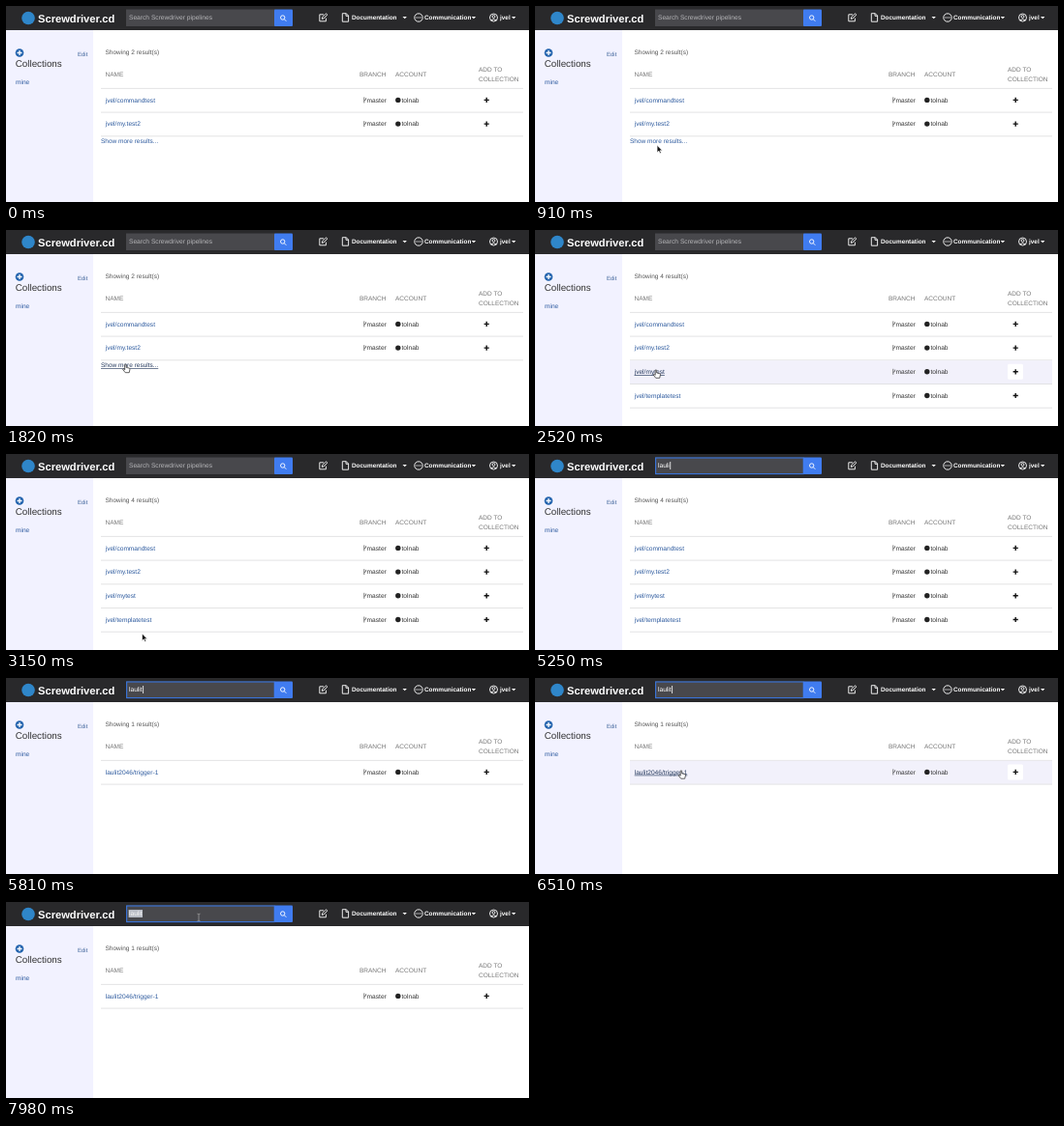
An HTML page for the animation above (8000 ms loop, 540 px wide and 203 px high).

```html
<!DOCTYPE html>
<html lang="en">
<head>
<meta charset="utf-8">
<title>Pipeline search</title>
<style>
  html, body { margin: 0; width: 100%; height: 100%; overflow: hidden; background: #fff; }
  svg { display: block; width: 100%; height: 100%; }
  text { font: 6.6px "Liberation Sans", Arial, sans-serif; fill: #333; white-space: pre; text-rendering: geometricPrecision; }
  .bar text { fill: #fff; font-weight: bold; font-size: 6.4px; }
  .bar .brand { font-size: 11.15px; }
  .bar .field { font-weight: normal; font-size: 6.65px; }
  .head { fill: #777; font-size: 6.5px; }
  .link { fill: #2d5a9e; }
  .icon { fill: none; stroke: #fff; stroke-width: .9; }
  .rule { stroke: #dcdcde; stroke-width: .8; }
  .hover { fill: #f2f1fb; }
</style>
</head>
<body>
<svg viewBox="0 0 540 203">
  <rect width="540" height="203" fill="#fff"/>
  <rect y="25" width="90" height="178" fill="#f2f2ff"/>

  <g class="bar">
    <rect width="540" height="25" fill="#29292b"/>
    <circle cx="23" cy="12.5" r="6.8" fill="#2f86c9"/>
    <text class="brand" x="33" y="16.6">Screwdriver.cd</text>
    <rect x="124" y="3.5" width="154" height="17.5" fill="#48484c"/>
    <rect id="focus" x="124.6" y="4" width="152.6" height="16.6" fill="none" stroke="#3a76dd" stroke-width="1.1"/>
    <rect id="selection" x="126.6" y="8" width="14.4" height="8" fill="#b9bdc6"/>
    <text id="query" class="field" x="127" y="14.2"></text>
    <path id="caret" d="M0 8v8" stroke="#fff" stroke-width=".8"/>
    <rect x="277" y="3.5" width="19" height="17.5" rx="1" fill="#407cf0"/>
    <circle cx="285.7" cy="12" r="2.2" class="icon" stroke-width="1.2"/>
    <path class="icon" d="M287.3 13.7l2 2"/>

    <path class="icon" d="M328 8.8h-4.2v7h6.6v-3.2M326.3 13.4l.4-1.8 3.8-3.8 1.3 1.3-3.8 3.8z"/>
    <path class="icon" d="M347.3 7.7h4l2.3 2.3v6.2h-6.3zM351 7.8v2.5h2.5"/>
    <text x="357" y="14.2">Documentation</text>
    <circle class="icon" cx="426" cy="12" r="4.2"/>
    <path d="M423.4 12h5.4" stroke="#fff" stroke-width="1.2" stroke-dasharray="1.2 .8"/>
    <text x="432" y="14.2">Communication</text>
    <circle class="icon" cx="503.5" cy="12" r="4"/>
    <circle class="icon" cx="503.5" cy="10.9" r="1.4"/>
    <path class="icon" d="M500.8 14.8q2.7-2.4 5.4 0"/>
    <text x="510" y="14.2">jvel</text>
    <path fill="#fff" d="M409.5 10.9h4.4l-2.2 2.3zM480.7 10.9h4.4l-2.2 2.3zM522 10.9h4.4l-2.2 2.3z"/>
  </g>

  <circle cx="14" cy="48.5" r="4.3" fill="#2464ae"/>
  <path d="M11.5 48.5h5M14 46v5" stroke="#fff" stroke-width="1.3"/>
  <text x="74" y="52.4" style="font-size:6px;fill:#3f6499">Edit</text>
  <text x="9.8" y="63.2" style="font-size:9.8px">Collections</text>
  <text class="link" x="10" y="81.3">mine</text>

  <text id="count" x="102.5" y="49.6" style="fill:#555;font-size:6.5px"></text>
  <g>
    <text class="head" x="102.5" y="72.7">NAME</text>
    <text class="head" x="365" y="72.7">BRANCH</text>
    <text class="head" x="402" y="72.7">ACCOUNT</text>
    <text class="head" x="488" y="68.2">ADD TO</text>
    <text class="head" x="488" y="78">COLLECTION</text>
  </g>
  <path class="rule" d="M98 85.4h436"/>
  <g id="rows"></g>
  <text id="more" class="link" x="98" y="142" style="font-size:6.5px">Show more results...</text>

  <g id="cursor">
    <path id="arrow" d="M0 0v7.4l1.8-1.6 1.2 2.6 1.2-.6-1.2-2.4h2.3z" fill="#111" stroke="#fff" stroke-width=".6"/>
    <path id="hand" d="M-.8.2q.8-.8 1.5 0v2.7l3 .7q.9.3.7 1.4l-.7 3.2h-4l-2.6-3.3q.4-1 1.3-.3l.8.7z" fill="#fff" stroke="#222" stroke-width=".7"/>
    <path id="beam" d="M-1.5-3.8q1.5 0 1.5 1v5.6q0 1-1.5 1M1.5-3.8q-1.5 0-1.5 1M0 2.8q0 1 1.5 1" fill="none" stroke="#aaa" stroke-width=".7"/>
  </g>
</svg>

<script>
const LOOP = 8000, STEP = 70, ROW_TOP = 85.4, ROW_HEIGHT = 24.7;
const QUERY = "laulit";
const KEY_TIMES = [4690, 4830, 4970, 5110, 5220, 5400];
const TIMES = { expand: 2200, focus: 4060, results: 5700, select: 7600 };
const NAMES = ["jvel/commandtest", "jvel/my.test2", "jvel/mytest", "jvel/templatetest"];
const FOUND = ["laulit2046/trigger-1"];

// time, x, y of the pointer
const PATH = [
  [350, 165, 186], [840, 127, 146], [1050, 123.5, 139.5], [2450, 123.5, 139.5],
  [2800, 138, 193], [3100, 140.5, 186], [3450, 140.5, 186],
  [3950, 209, 12], [5900, 209, 12], [6350, 151, 96], [6540, 151, 96],
  [6680, 160, 82], [7250, 199, 16], [8000, 199, 16]
];

const $ = id => document.getElementById(id);
const show = (el, on) => el.setAttribute("visibility", on ? "visible" : "hidden");
const underline = (el, on) => {
  el.style.textDecoration = on ? "underline" : "none";
  el.style.fill = on ? "#263a5e" : "";
};

const rows = NAMES.map((_, i) => {
  const row = document.createElementNS("http://www.w3.org/2000/svg", "g");
  row.setAttribute("transform", `translate(0 ${ROW_TOP + i * ROW_HEIGHT})`);
  row.innerHTML = `
    <g class="mark"><rect class="hover" x="98" y=".4" width="436" height="24"/>
      <rect x="488" y="4" width="16" height="16" rx="1.5" fill="#fff"/></g>
    <text class="link name" x="102.7" y="14.2"></text>
    <path d="M369.8 9v6M369.8 12.6q2.2-.3 2-2.8" fill="none" stroke="#444" stroke-width=".7"/>
    <text x="372.6" y="14.2">master</text>
    <circle cx="404.8" cy="12" r="2.7" fill="#222"/>
    <text x="408.5" y="14.2">tolnab</text>
    <path d="M493.6 12h5.2M496.2 9.4v5.2" stroke="#111" stroke-width="1.4"/>
    <path class="rule" d="M98 ${ROW_HEIGHT}h436"/>`;
  $("rows").append(row);
  return { row, mark: row.querySelector(".mark"), name: row.querySelector(".name") };
});

function pointerAt(t) {
  const next = PATH.findIndex(p => p[0] > t);
  if (next < 1) return null;
  const [t0, x0, y0] = PATH[next - 1], [t1, x1, y1] = PATH[next];
  const u = (t - t0) / (t1 - t0), k = u * u * (3 - 2 * u);
  return { x: x0 + (x1 - x0) * k, y: y0 + (y1 - y0) * k };
}

function drawField(t) {
  const typed = QUERY.slice(0, KEY_TIMES.filter(k => k <= t).length);
  const selected = t >= TIMES.select, focused = t >= TIMES.focus;
  const query = $("query");
  query.textContent = typed || "Search Screwdriver pipelines";
  query.style.fill = selected ? "#f5f5f5" : typed ? "#fff" : "#b5b5b8";
  show($("focus"), focused);
  show($("selection"), selected);
  const recent = KEY_TIMES.some(k => t >= k && t < k + 500);
  const blinkOn = (t - TIMES.focus) % 1060 < 530 || (t > 6360 && t < 6700);
  show($("caret"), focused && !selected && (recent || blinkOn));
  const end = typed ? query.getComputedTextLength() + .9 : .2;
  $("caret").setAttribute("transform", `translate(${127 + end} 0)`);
}

function draw(t) {
  const found = t >= TIMES.results;
  const names = found ? FOUND : NAMES.slice(0, t < TIMES.expand ? 2 : 4);
  const p = pointerAt(t);
  const typing = t >= KEY_TIMES[0] && t < 5900;
  const visible = p && !typing;
  let overLink = false;

  $("count").textContent = `Showing ${names.length} result(s)`;
  rows.forEach(({ row, mark, name }, i) => {
    const used = i < names.length;
    row.style.display = used ? "" : "none";
    if (!used) return;
    name.textContent = names[i];
    const dy = visible ? p.y - ROW_TOP - i * ROW_HEIGHT : -1;
    const over = dy >= 0 && dy < ROW_HEIGHT && p.x > 98;
    const onName = over && dy > 8 && dy < 17 && p.x < 103 + name.getComputedTextLength();
    mark.style.display = over ? "" : "none";
    underline(name, onName);
    overLink ||= onName;
  });

  const canExpand = names.length === 2;
  const overMore = canExpand && visible && p.y > 135 && p.y < 144 && p.x < 157;
  $("more").style.display = canExpand ? "" : "none";
  underline($("more"), overMore);
  drawField(t);

  show($("cursor"), visible);
  if (!visible) {
    ["arrow", "hand", "beam"].forEach(id => show($(id), false));
    return;
  }
  const inField = p.y < 21 && p.x > 124 && p.x < 277;
  const shape = inField ? "beam" : overLink || overMore ? "hand" : "arrow";
  ["arrow", "hand", "beam"].forEach(id => show($(id), id === shape));
  $("cursor").setAttribute("transform", `translate(${p.x} ${p.y})`);
}

const start = performance.now();
function tick() {
  const t = (performance.now() - start) % LOOP;
  draw(Math.floor(t / STEP) * STEP);
  requestAnimationFrame(tick);
}
tick();
</script>
</body>
</html>
```
